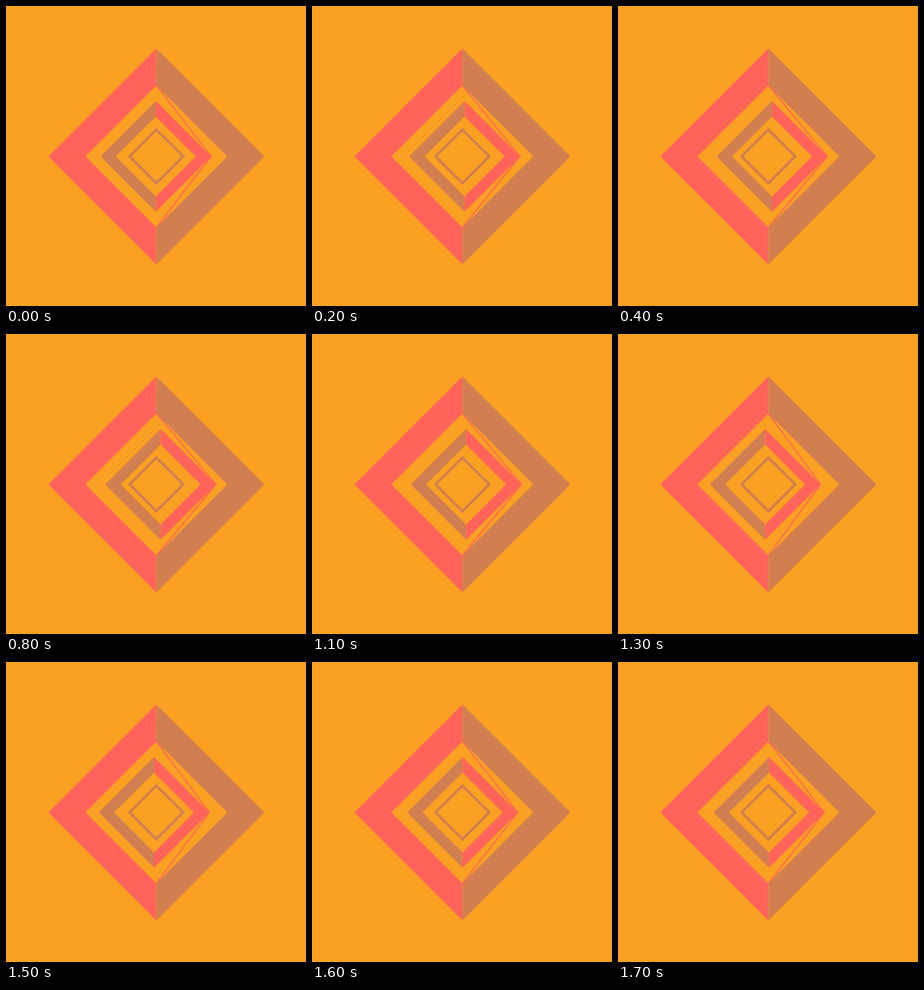
Write an HTML page that moves like this. It is 300x300 px and loops after 6700 ms.

```html
<!DOCTYPE html>
<html lang="en">
<head>
<meta charset="utf-8">
<title>Diamonds</title>
<style>
  html, body { margin: 0; width: 100%; height: 100%; overflow: hidden; background: #faa022; }
  svg { display: block; width: 100%; height: 100%; }
  .pink { fill: #ff635a; }
  .tan { fill: #d17f50; }
</style>
</head>
<body>
<svg viewBox="0 0 300 300">
  <path id="outerLeft" class="pink"/>
  <path id="outerRight" class="tan"/>
  <path id="wire" fill="none" stroke="#ff635a" stroke-width="1.1"/>
  <g id="ring">
    <path id="ringLeft" class="tan"/>
    <path id="ringRight" class="pink"/>
  </g>
  <path id="core" fill="none" stroke="#d17f50" stroke-width="2.6"/>
</svg>
<script>
const LOOP = 6700, STEP = 100, C = 150.4;
const OUTER = 108, GAP = 71, RING = 55.3, HOLE = 40, CORE = 26.8;
const REACH = 4.2;
const swing = [4.2, 3.7, 0.2, -3.2, -4.4, -2.4, 0.2, 0.6];
const el = id => document.getElementById(id);

// Half of a diamond frame; side is -1 for left, 1 for right.
function chevron(id, side, big, small) {
  el(id).setAttribute('d',
    `M${C} ${C - big}L${C + side * big} ${C}L${C} ${C + big}` +
    `V${C + small}L${C + side * small} ${C}L${C} ${C - small}Z`);
}

// Ease out to the right, rest, then swing left and settle.
function shift(t) {
  if (t < 1000) {
    const p = Math.min(t / 800, 1);
    return REACH - (REACH + 0.6) * (1 - p) ** 3;
  }
  return swing[Math.min((t - 1000) / STEP, swing.length - 1)];
}

function draw(time) {
  const t = Math.floor((time % LOOP) / STEP) * STEP;
  const x = shift(t);
  el('ring').setAttribute('transform', `translate(${x} 0)`);
  el('wire').setAttribute('d', `M${C} ${C - GAP}L${C + RING + x} ${C}L${C} ${C + GAP}`);
}

chevron('outerLeft', -1, OUTER, GAP);
chevron('outerRight', 1, OUTER, GAP);
chevron('ringLeft', -1, RING, HOLE);
chevron('ringRight', 1, RING, HOLE);
el('core').setAttribute('d',
  `M${C} ${C - CORE}L${C + CORE} ${C}L${C} ${C + CORE}L${C - CORE} ${C}Z`);

const start = performance.now();
function tick() {
  draw(performance.now() - start);
  requestAnimationFrame(tick);
}
tick();
</script>
</body>
</html>
```
